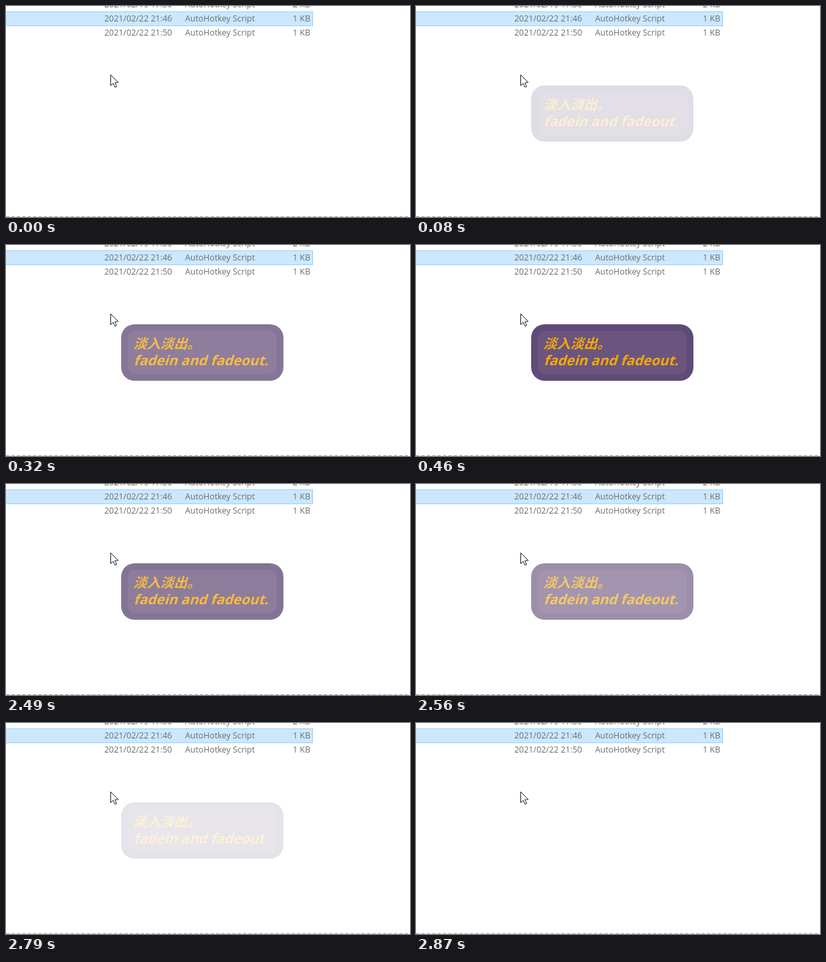
An HTML page with a canvas that plays this animation: 600 by 314 pixels, repeating every 4110 ms.

```html
<!DOCTYPE html>
<html lang="en">
<head>
<meta charset="utf-8">
<title>Fade in and out</title>
<style>
  html, body { margin: 0; width: 100%; height: 100%; overflow: hidden; background: #fff; }
  canvas { display: block; }
</style>
</head>
<body>
<canvas id="stage" width="600" height="314"></canvas>
<script>
const W = 600, H = 314, LOOP = 4110;
const ctx = document.getElementById('stage').getContext('2d');

// [time in ms, card opacity], each held until the next
const STEPS = [
  [0, 0],
  [80, 0.18], [170, 0.37], [260, 0.57], [320, 0.76], [390, 0.94], [460, 1],
  [2490, 0.77], [2560, 0.62], [2640, 0.46], [2710, 0.31], [2790, 0.15], [2870, 0]
];

const ROWS = [
  ['2021/02/19 17:36', '2 KB', 2],
  ['2021/02/22 21:46', '1 KB', 23],
  ['2021/02/22 21:50', '1 KB', 44]
];

function layer(paint) {
  const c = document.createElement('canvas');
  c.width = W;
  c.height = H;
  paint(c.getContext('2d'));
  return c;
}

function roundBox(g, x, y, w, h, r, color) {
  g.fillStyle = color;
  g.beginPath();
  g.roundRect(x, y, w, h, r);
  g.fill();
}

function slanted(g, text, x, y, font) {
  g.save();
  g.transform(1, 0, -0.3, 1, x, y);
  g.font = font;
  g.fillText(text, 0, 0);
  g.restore();
}

function paintCursor(g, x, y) {
  g.save();
  g.translate(x + 0.5, y + 0.5);
  g.beginPath();
  [[0, 0], [0, 16], [3.6, 12.6], [6.4, 18.4], [8.8, 17.4], [6.2, 11.6], [11.2, 11.3]]
    .forEach(p => g.lineTo(p[0], p[1]));
  g.closePath();
  g.fillStyle = '#fff';
  g.fill();
  g.strokeStyle = '#1c1c2c';
  g.lineWidth = 1;
  g.stroke();
  g.restore();
}

function paintDesktop(g) {
  g.fillStyle = '#fff';
  g.fillRect(0, 0, W, H);

  g.fillStyle = '#99d1ff';
  g.fillRect(0, 8, 456, 22);
  g.fillStyle = '#cce8ff';
  g.fillRect(0, 9, 455, 20);

  g.font = '12.4px "Open Sans", "Noto Sans", sans-serif';
  g.fillStyle = '#6d6d6d';
  for (const [date, size, y] of ROWS) {
    g.textAlign = 'left';
    g.fillText(date, 146, y);
    g.fillText('AutoHotkey Script', 266, y);
    g.textAlign = 'right';
    g.fillText(size, 452, y);
  }

  g.fillStyle = '#a0a0a0';
  for (let x = 0; x < W; x += 8) g.fillRect(x, 313, 5, 1);

  paintCursor(g, 155, 102);
}

function paintCard(g) {
  roundBox(g, 171, 118, 241, 84, 20, '#5f4b77');
  roundBox(g, 181, 128, 221, 64, 11, '#6b557f');
  g.fillStyle = '#f5a905';
  slanted(g, '淡入淡出。', 189, 154, 'bold 20px "Noto Sans CJK SC", "Noto Sans CJK", sans-serif');
  slanted(g, 'fadein and fadeout.', 189.5, 179, 'bold 20.4px "Open Sans", "Noto Sans", sans-serif');
}

const desktop = layer(paintDesktop);
const card = layer(paintCard);

function opacityAt(t) {
  let value = 0;
  for (const [time, alpha] of STEPS) if (t >= time) value = alpha;
  return value;
}

const start = performance.now();

function draw() {
  const t = Math.max(0, performance.now() - start) % LOOP;
  ctx.globalAlpha = 1;
  ctx.drawImage(desktop, 0, 0);
  ctx.globalAlpha = opacityAt(t);
  ctx.drawImage(card, 0, 0);
  requestAnimationFrame(draw);
}
draw();
</script>
</body>
</html>
```
